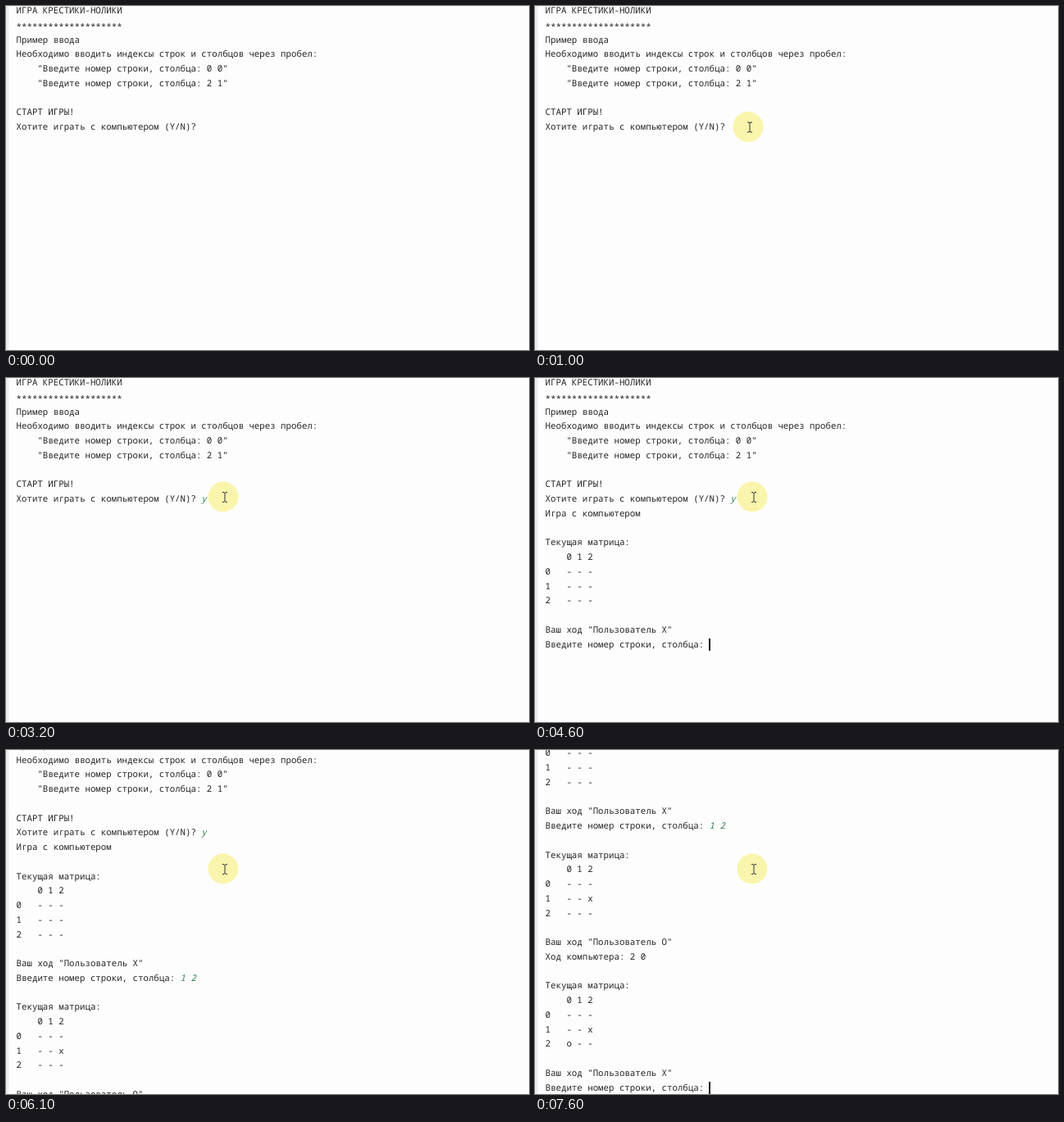
Animation of 638 by 420 pixels, one loop 8 s. Source, as an HTML page:

```html
<!DOCTYPE html>
<html lang="ru">
<head>
<meta charset="utf-8">
<title>Крестики-нолики</title>
<style>
html, body { margin: 0; width: 100%; height: 100%; overflow: hidden; background: #fdfdfd; }
#stage { position: relative; width: 638px; height: 420px; overflow: hidden; background: #fdfdfd; }
#edge { position: absolute; left: 0; top: 0; width: 3px; height: 420px; background: #ececec; border-right: 1px solid #f5f5f5; }
#page { position: absolute; left: 12.6px; }
pre { margin: 0; font: 500 10.75px/17.75px "Noto Sans Mono", "DejaVu Sans Mono", monospace; color: #222; text-rendering: geometricPrecision; }
i { color: #2c7f4c; }
b { font-weight: inherit; position: relative; top: 2px; }
#caret { position: absolute; width: 2px; height: 15px; background: #111; }
#mouse { position: absolute; left: -20px; top: -20px; mix-blend-mode: multiply; }
</style>
</head>
<body>
<div id="stage">
  <div id="edge"></div>
  <div id="page"><pre id="text"></pre><div id="caret"></div></div>
  <svg id="mouse" width="44" height="40">
    <circle cx="20" cy="20" r="18.5" fill="#fcf7ae"/>
    <path d="M19 14.5h2l1 1 1-1h2M22 15v11M19 26.5h2l1-1 1 1h2" fill="none" stroke="#333"/>
  </svg>
</div>
<script>
const LOOP = 8000, STEP = 100, ROW = 17.75, COL = 6.45, TOP = -2;
const $ = id => document.getElementById(id);
const prompt = 'Введите номер строки, столбца: ';
const board = (...rows) => ['', 'Текущая матрица:', '    0 1 2', ...rows.map((r, i) => `${i}   ${r}`), ''];
const turn = who => `Ваш ход "Пользователь ${who}"`;
const typed = s => s ? `<i>${s}</i>` : '';

const intro = [
  'ИГРА КРЕСТИКИ-НОЛИКИ', `<b>${'*'.repeat(20)}</b>`, 'Пример ввода',
  'Необходимо вводить индексы строк и столбцов через пробел:',
  `    "${prompt}0 0"`, `    "${prompt}2 1"`, '', 'СТАРТ ИГРЫ!'
];
const reply = [
  ...board('- - -', '- - x', '- - -'), turn('O'), 'Ход компьютера: 2 0',
  ...board('- - -', '- - x', 'o - -'), turn('X'), prompt
];

// Each key is [time, ...values]; values are interpolated linearly.
const path = [[400, 585, 4], [500, 455, 40], [600, 325, 85], [700, 232, 142], [800, 218, 154],
  [900, 250, 150], [1000, 260, 147.5], [1300, 260, 147.5], [1500, 265, 145]];
const scroll = [[5900, 0], [6000, 12], [6100, 46.7], [6200, 150], [6300, 232.5]];

function sample(keys, t) {
  const n = keys.findIndex(k => k[0] > t);
  if (n < 0) return keys.at(-1).slice(1);
  if (!n) return keys[0].slice(1);
  const a = keys[n - 1], b = keys[n], f = (t - a[0]) / (b[0] - a[0]);
  return a.slice(1).map((v, i) => v + (b[i + 1] - v) * f);
}

const within = (t, from, to) => t >= from && t < to;

function render(t) {
  const move = '1 2'.slice(0, (t >= 5000) + (t >= 5200) + (t >= 5400));
  const lines = [...intro, 'Хотите играть с компьютером (Y/N)? ' + typed(t >= 2200 ? 'y' : '')];
  if (t >= 3300) lines.push('Игра с компьютером', ...board('- - -', '- - -', '- - -'), turn('X'), prompt + typed(move));
  if (t >= 5900) lines.push(...reply);
  const html = lines.join('\n');
  if (html !== render.last) $('text').innerHTML = render.last = html;

  const row = lines.length - 1;
  const col = row === 8 ? 36 : prompt.length + (t < 5900 ? move.length : 0);
  const lit = within(t, 2200, 3000) || within(t, 3300, 4000) || within(t, 4600, 7100) || t >= 7600;
  $('caret').style.cssText = `left:${col * COL - 1}px;top:${row * ROW + .5}px;visibility:${lit ? 'visible' : 'hidden'}`;
  $('page').style.top = TOP - sample(scroll, t)[0] + 'px';

  const [x, y] = sample(path, t);
  $('mouse').style.transform = `translate(${x}px,${y}px)`;
  $('mouse').style.visibility = t < 400 ? 'hidden' : 'visible';
}

const start = performance.now();
function tick() {
  const t = (performance.now() - start) % LOOP;
  render(Math.floor(t / STEP) * STEP);
  requestAnimationFrame(tick);
}
tick();
</script>
</body>
</html>
```
